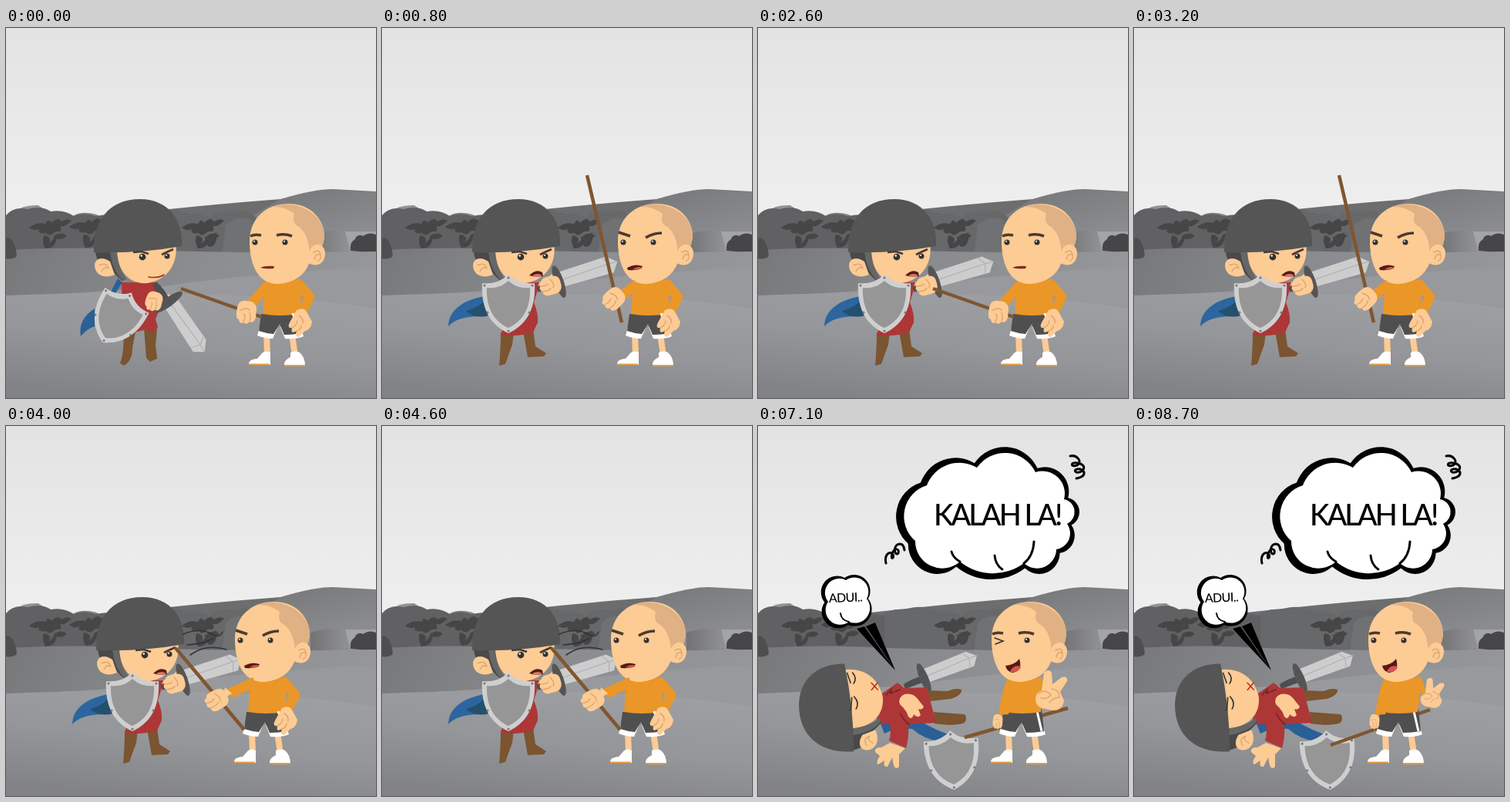
These frames come from a looping animation (480x480 px, 8900 ms). An HTML page:

```html
<!DOCTYPE html>
<html lang="ms">
<head>
<meta charset="utf-8">
<title>Duel</title>
<style>
html, body { margin: 0; width: 100%; height: 100%; overflow: hidden; background: #eee; }
svg { display: block; width: 100vw; height: 100vh; }
[data-on] { display: none; }
[data-on].on { display: inline; }
text { font-family: Lato, "Open Sans", sans-serif; font-weight: 500; fill: #050505; }
.skin { fill: #fdcb94; }
.crease { fill: none; stroke: #dca873; stroke-width: 1.5; stroke-linecap: round; }
.orange { fill: #ea9628; }
.sleeve { fill: none; stroke: #ea9628; stroke-width: 13; stroke-linejoin: round; }
.staff { stroke: #7f5630; stroke-width: 4.5; }
.brow { fill: none; stroke: #4b3b32; stroke-width: 3.6; }
.thin { stroke-width: 2.6; }
.dark { fill: #555; }
.red { fill: #ad3737; }
.boot { fill: #7b5430; }
.line { fill: none; stroke: #333; stroke-width: 1.6; stroke-linecap: round; }
.ink { fill: none; stroke: #050505; stroke-width: 3; stroke-linecap: round; }
</style>
</head>
<body>
<svg viewBox="0 0 480 480">
<defs>
  <linearGradient id="sky" x2="0" y2="1"><stop stop-color="#e3e3e3"/><stop offset=".75" stop-color="#eee"/></linearGradient>
  <linearGradient id="field" x2="1" y2=".2"><stop stop-color="#77787a"/><stop offset=".5" stop-color="#8b8c8f"/><stop offset="1" stop-color="#96979a"/></linearGradient>
  <linearGradient id="near" x1=".7" y1="0" x2=".3" y2="1"><stop stop-color="#9d9fa2"/><stop offset=".5" stop-color="#949699"/><stop offset="1" stop-color="#828386"/></linearGradient>
  <linearGradient id="hill" x2=".5" y2="1"><stop stop-color="#747577"/><stop offset="1" stop-color="#909194"/></linearGradient>
  <linearGradient id="mist"><stop stop-color="#737375"/><stop offset="1" stop-color="#929396"/></linearGradient>
  <g id="leaves" fill="#464647">
    <path d="M30 259Q40 251 51 254Q55 246 59 253Q67 244 72 251Q80 246 85 250Q76 259 70 257Q75 265 64 264Q56 272 52 266Q40 268 43 261Q36 264 30 259Z"/>
    <path d="M49 269Q61 271 55 280Q62 275 63 269Q72 264 79 269Q74 276 66 273Q63 287 51 286Q46 277 49 269Z"/>
  </g>
  <g id="eye"><circle r="3.5" fill="#333"/><circle cx="-1" cy="-1.3" r="1" fill="#fff"/></g>
  <g id="fist">
    <path class="skin" d="M-12-5Q-10-16 0-14Q12-14 13-4L12 8Q9 16 4 13Q0 18-4 14Q-9 17-10 10Q-15 9-12-5Z"/>
    <path class="crease" d="M-4 13Q-1 8-3 3M4 12Q6 7 4 1M-8-2Q0-6 4-2"/>
  </g>
  <g id="shield">
    <path fill="#cfcfcf" d="M0-39C-10-28-22-26-34-27C-36 8-22 28 0 38C22 28 36 8 34-27C22-26 10-28 0-39Z"/>
    <path fill="#969696" d="M0-30C-9-22-18-20-28-21C-29 6-18 23 0 31C18 23 29 6 28-21C18-20 9-22 0-30Z"/>
    <g fill="#777"><circle cy="-34" r="1.5"/><circle cx="-31" cy="-24" r="1.5"/><circle cx="31" cy="-24" r="1.5"/><circle cx="-27" cy="11" r="1.5"/><circle cx="27" cy="11" r="1.5"/><circle cy="35" r="1.5"/></g>
  </g>
  <g id="sword">
    <path fill="#cdcdcd" d="M16-17L81-16L93-5L84 7L16 3Z"/>
    <path fill="none" stroke="#b3b3b3" stroke-width="1.3" d="M18-6H80L93-5M76-15L82-6L78 6"/>
    <path d="M-17-8Q-2-11 12-8V0L-17-1Z" fill="#4e4e50"/>
    <ellipse cx="13" cy="-5" rx="6" ry="22" fill="#555"/>
  </g>
  <g id="head">
    <path class="skin" d="M145 282L223 278C227 304 214 326 187 331C161 333 147 314 145 282Z"/>
    <path d="M119 288H139Q143 311 158 326L154 328Q141 319 137 304L123 303Q119 296 119 288Z" fill="#49494a"/>
    <path d="M138 288L147 288Q148 312 160 326L154 327Q140 314 138 288Z" fill="#666"/>
    <path class="skin" d="M138 303C125 294 115 302 119 313C122 322 133 325 144 320Z"/>
    <path class="crease" d="M124 308Q133 303 136 312M127 316Q131 308 136 312"/>
    <path class="dark" d="M117 291C115 250 137 222 177 222C214 222 233 250 231 283Q175 293 117 291Z"/>
    <g data-on="rest lunge hurt">
      <use href="#eye" transform="translate(180 297) scale(1.25)"/><use href="#eye" transform="translate(212 296)"/>
      <path class="brow thin" d="M168 291L179 290L188 293M205 294L211 291L220 287"/>
    </g>
    <path data-on="rest" class="line" style="stroke:#a02f25" d="M188 323Q201 325 208 320"/>
    <g data-on="lunge"><path fill="#551b17" d="M191 321Q200 312 208 317L209 322Q200 324 191 321Z"/><path fill="#d5776c" d="M195 321Q202 317 208 321Q202 325 195 321Z"/></g>
    <path data-on="hurt" class="line" style="stroke:#a02f25" d="M192 324Q200 317 209 322"/>
    <g data-on="out" class="line">
      <path d="M172 296Q180 301 188 294M205 294Q212 299 219 293M170 289L187 291M206 290L219 286"/>
      <path style="stroke:#b53024" d="M196 317L205 325M196 325L205 317"/>
    </g>
  </g>
  <path id="cloud" d="M219 77A45 45 0 0 1 284 54A44 44 0 0 1 360 60A29 29 0 0 1 397 95A17 17 0 0 1 401 127A21 21 0 0 1 387 160A25 25 0 0 1 345 178A68 68 0 0 1 262 176A35 35 0 0 1 204 149A42 42 0 0 1 219 77Z"/>
  <path id="puff" d="M91 228A18.500 18.500 0 0 1 114 200A18.500 18.500 0 0 1 141 224A19.500 19.500 0 0 1 118 254A19 19 0 0 1 91 228Z"/>
</defs>

<rect width="480" height="300" fill="url(#sky)"/>
<path d="M10 240Q20 229 42 230L56 240Z" fill="#929294"/>
<path d="M86 244Q100 236 120 243L110 260H86Z" fill="#858587"/>
<path d="M110 246Q260 229 356 222L480 240V300H110Z" fill="#6c6d6f"/>
<path d="M310 250Q335 234 356 222Q400 209 424 209L480 212V300H310Z" fill="url(#hill)"/>
<path d="M395 268Q420 260 448 264V300H395Z" fill="url(#mist)"/>
<path d="M440 264H480V290H447Z" fill="#a3a4a6"/>
<path d="M447 289Q446 277 452 275Q456 266 463 270Q471 264 480 268V292Z" fill="#464648"/>
<path d="M160 247Q172 236 190 238Q215 230 235 241Q253 239 263 246Q278 234 296 239Q318 231 330 255V294H160Z" fill="#67686a"/>
<path d="M285 256Q298 242 318 249L330 295H280Z" fill="#707173"/>
<path d="M0 243Q10 231 28 235Q46 230 58 238Q75 235 88 244Q100 238 116 244Q144 239 164 247V295H0Z" fill="#616163"/>
<use href="#leaves"/><use href="#leaves" x="52" y="-1"/><use href="#leaves" transform="translate(198)"/>
<path d="M258 270Q264 273 262 278Q266 268 273 265V275Q270 285 263 284Q258 277 258 270Z" fill="#464647"/>
<path d="M0 288Q90 283 170 288Q320 293 480 290V480H0Z" fill="url(#field)"/>
<path d="M0 272Q12 272 14 296Q8 301 0 299Z" fill="#4e4e50"/>
<path d="M0 348Q110 344 205 335Q310 319 480 310V480H0Z" fill="#97999c"/>
<path d="M0 347Q140 341 300 347Q390 350 480 364V480H0Z" fill="url(#near)"/>

<g id="knight" data-on="rest lunge">
  <g data-on="rest" transform="translate(-3)">
    <path d="M148 325L154 330L140 352L137 346ZM118 364Q96 378 100 400Q108 390 118 387Z" fill="#2a6097"/>
    <path class="boot" d="M155 394H171L167 415Q167 432 156 438L151 435Q157 420 155 394ZM182 390H199L197 412L199 429L190 433L185 428Z"/>
    <path class="red" d="M153 330H198L207 352L197 378L200 388L193 395L185 391L154 399Z"/>
    <use href="#shield" transform="translate(147 376) rotate(30) scale(.97)"/>
    <path class="skin" d="M197 344L216 346L215 356L201 362Z"/>
    <use href="#sword" transform="translate(202 348) rotate(54)"/>
    <use href="#fist" transform="translate(195 354) rotate(10) scale(.85)"/>
    <use href="#head"/>
  </g>
  <g data-on="lunge">
    <path d="M139 347C111 351 87 362 86 387Q98 373 133 374Z" fill="#2c659f"/>
    <path d="M133 352Q128 362 109 367Q121 378 139 373Z" fill="#22506d"/>
    <path class="boot" d="M154 395H171L169 411Q164 424 160 436L152 438Q154 415 154 395ZM183 393L196 391L199 413L213 422L210 426L189 427Z"/>
    <path class="red" d="M162 330H205L197 356Q203 370 202 382L196 395Q176 401 155 398Z"/>
    <path class="skin" d="M202 334L222 318L229 329L213 345Z"/>
    <use id="blade" href="#sword"/>
    <use href="#head"/>
    <use href="#shield" transform="translate(164 358)"/>
    <use href="#fist" transform="translate(219 334) rotate(70) scale(.95)"/>
  </g>
</g>

<g data-on="hurt out">
  <use href="#sword" transform="translate(206 336) rotate(-23) scale(.93)"/>
  <path d="M158 384Q190 373 216 386Q232 395 247 400L236 409Q216 407 200 393Q181 390 164 399Z" fill="#2a6097"/>
  <path class="boot" d="M220 343L246 344Q257 339 264 342Q265 349 250 354L223 357ZM228 371L268 374Q272 378 268 385Q256 390 229 386Z"/>
  <path class="red" d="M158 349L181 333L190 340L219 339L231 385L195 387Q196 405 192 418L170 408Q174 395 170 386L153 388Z"/>
  <path class="line" style="stroke:#702323" d="M166 349L173 342L172 347L184 342M185 373Q190 384 196 387"/>
  <path class="skin" d="M184 361Q181 352 190 348Q201 346 207 354L215 364Q213 369 208 367L211 375Q207 380 202 374Q200 382 195 377Q193 369 184 361ZM171 411L191 418L183 426L183 442Q179 447 176 440L174 430L168 442Q162 443 164 434L156 439Q152 437 158 428L152 423Q151 416 160 417Z"/>
  <use href="#shield" transform="translate(252 434) rotate(-4) scale(1.04 1)"/>
  <use href="#head" transform="translate(128 359) rotate(-92) translate(-180 -297)"/>
</g>

<g data-on="adui">
  <use href="#puff" transform="translate(113.500 227.500) scale(1.13) translate(-115 -227)"/>
  <path d="M128 263L138 260L178 317ZM140 260L152 255L178 317Z"/>
  <use href="#puff" fill="#fff"/>
  <path class="ink" style="stroke-width:2" d="M107 243Q108 252 118 254"/>
  <text x="92" y="229" font-size="16" letter-spacing="-.6" transform="rotate(-2 92 229)">ADUI..</text>
</g>

<g id="man">
  <path data-on="V" class="staff" d="M281 404L415 366"/>
  <path data-on="W" class="staff" d="M267 414L396 368"/>
  <path data-on="D" class="staff" d="M302 376L449 180"/>
  <path class="skin" d="M334 397H342L343 424H335ZM367 397H375L379 425H371Z"/>
  <path fill="#fff" d="M333 421Q338 418 343 421V437H315Q314 430 326 429ZM369 421Q376 418 381 421Q388 427 388 438H361Q360 431 369 427Z"/>
  <path d="M315 436.500H342M361 438H388" stroke="#e89a37" stroke-width="2"/>
  <path fill="#fff" d="M329 388L352 389L346 403Q336 403 326 399ZM356 388L381 385L386 400Q376 404 362 403Z"/>
  <path fill="#4f4f50" d="M331 371L381 367L384 396Q372 398 361 398L355 384L347 397Q337 396 328 393Z"/>
  <path data-on="V W" d="M375 370L381 396" stroke="#fff" stroke-width="3"/>
  <path class="orange" d="M336 327Q357 334 381 325L384 340L380 371Q355 375 333 371Z"/>
  <g data-on="A B C D">
    <path class="sleeve" d="M378 330L394 349L383 370"/>
    <path d="M372 370L378 388" stroke="#fff" stroke-width="3"/>
    <path class="skin" d="M377 366Q387 361 391 370L397 381Q396 391 388 393L380 401Q374 400 377 393Q369 398 371 389Q364 390 368 382Z"/>
    <path class="crease" d="M377 393Q383 391 383 386M371 389Q377 386 378 380M380 373Q386 376 385 383"/>
  </g>
  <path class="skin" d="M316 277C316 246 338 228 367 228C396 228 413 249 413 270Q412 281 408 288L393 306Q384 329 354 332C323 333 316 300 316 277Z"/>
  <path fill="#dfb184" d="M344 232Q369 224 391 236Q413 249 413 271Q412 280 408 286Q396 281 394 295Q393 264 377 256Q371 252 374 241Q362 231 344 232Z"/>
  <path class="skin" d="M394 288C401 275 415 281 414 294C412 309 400 310 391 304Z"/>
  <path class="crease" d="M399 291Q407 286 408 295M400 300Q402 291 408 295Q409 302 404 302"/>
  <use href="#eye" x="362" y="278"/>
  <use data-on="A B C D W" href="#eye" x="323" y="278"/>
  <path data-on="A V W" class="brow" d="M317 270Q323 267 331 269M351 269Q361 266 371 270"/>
  <path data-on="B C D" class="brow" d="M317 265L332 270M352 272Q362 266 373 266"/>
  <path data-on="V" class="line" d="M320 275L331 279L321 283"/>
  <path data-on="A" fill="#7a2b22" d="M330 311Q336 308 348 309L347 312Q337 313 330 311Z"/>
  <g data-on="B C D"><path fill="#551b17" d="M328 311Q338 305 348 309Q347 315 329 314Z"/><path fill="#d5574c" d="M335 313Q342 308 348 311Q344 315 335 313Z"/></g>
  <g data-on="V W"><path fill="#551b17" d="M334 311Q346 310 352 302Q357 318 343 320Q336 319 334 311Z"/><path fill="#d5574c" d="M340 319Q344 309 354 312Q353 320 340 319Z"/></g>
  <g data-on="A">
    <path class="staff" d="M227 338L332 375"/><path class="sleeve" d="M341 332L318 358"/>
    <use href="#fist" transform="translate(312 368)"/>
  </g>
  <g data-on="B">
    <path class="line" d="M249 270Q270 261 286 270Q296 276 300 267M254 284Q279 282 288 275M258 297Q278 282 305 290"/>
    <path class="staff" d="M239 288L328 394"/><path class="sleeve" d="M342 332L309 347"/>
    <path class="skin" d="M303 339L312 347L300 354Z"/>
    <use href="#fist" transform="translate(293 355) rotate(55)"/>
  </g>
  <g data-on="C">
    <path class="staff" d="M276 191L321 382"/><path class="sleeve" d="M341 332L316 351"/>
    <use href="#fist" transform="translate(311 351) rotate(40)"/>
  </g>
  <g data-on="D"><path class="sleeve" d="M341 332L318 358"/><use href="#fist" transform="translate(311 366)"/></g>
  <g data-on="V W">
    <path class="orange" d="M335 331L347 333L338 374L325 375Q328 349 335 331Z"/>
    <use href="#fist" transform="translate(324 383) scale(.5 .65)"/>
    <path data-on="W" class="sleeve" d="M378 327L385 347"/>
    <g id="peace">
      <path class="skin" d="M381 343L384 320Q390 314 394 320L395 335L407 326Q415 324 414 331L405 345L410 356Q408 369 396 369L381 366Q373 363 373 354Q373 346 381 343Z"/>
      <path class="crease" d="M377 347Q386 340 393 349Q388 355 380 353M394 341Q404 342 404 352Q395 353 391 359"/>
    </g>
  </g>
</g>

<g data-on="shout">
  <use href="#cloud" transform="translate(298 112) scale(1.075 1.1) translate(-300 -112)"/>
  <use href="#cloud" fill="#fff"/>
  <path class="ink" d="M345 178Q357 169 358 150M262 176Q253 171 251 163M307 168Q308 180 317 186"/>
  <text x="228" y="129" font-size="38" letter-spacing="-3">KALAH LA!</text>
  <path class="ink" d="M405 39C413 37 422 46 414 51C405 54 405 46 414 48C429 50 422 62 413 60C407 56 419 53 423 60Q424 66 413 68M166 178C164 169 168 163 174 165C179 170 171 176 174 166C177 157 184 159 182 165C177 170 174 154 184 153Q189 153 190 161"/>
</g>
</svg>
<script>
const LOOP = 8900;
const $ = id => document.getElementById(id);
const manX = { A: 0, B: -19, C: -10, D: -1, V: -13, W: -12 };

// start ms, states, man's pose, knight shift, blade angle, tilt, man's hop
const steps = [
  [0, 'rest', 'A'], [200, 'lunge', 'C'], [400, 'lunge', 'B'], [600, 'rest', 'A'],
  [800, 'lunge', 'C'], [1000, 'lunge', 'B'], [1200, 'lunge', 'C'],
  [1400, 'lunge', 'C', -32, -10], [1600, 'lunge', 'B', -63, 0], [1800, 'lunge', 'C', -63, 0],
  [2000, 'lunge', 'B', -63, 0], [2200, 'lunge', 'C', -32, -10], [2400, 'lunge', 'B'],
  [2500, 'lunge', 'C'], [2600, 'lunge', 'A'], [2700, 'lunge', 'C'], [2800, 'rest', 'B'],
  [2900, 'rest', 'C'], [3000, 'lunge', 'A'], [3200, 'lunge', 'C'], [3400, 'lunge', 'B'],
  [3600, 'lunge', 'C'], [3800, 'lunge', 'A'], [4000, 'lunge', 'B'], [4200, 'lunge', 'C'],
  [4300, 'lunge', 'D'], [4400, 'lunge', 'C'], [4600, 'lunge', 'B'],
  [4800, 'lunge', 'B', 0, -19, -22], [5000, 'lunge', 'C', 10, -19, -46],
  [5200, 'lunge', 'V', 22, -19, -72], [5400, 'hurt', 'V'], [5600, 'hurt adui', 'V']
];
// victory dance: wink, hop, stand
for (let i = 0; i < 15; i++)
  steps.push([5900 + i * 200, 'out adui shout', 'VVW'[i % 3], 0, 0, 0, i % 3 === 1 ? -27 : 0]);

const parts = [...document.querySelectorAll('[data-on]')].map(el => [el, el.dataset.on.split(' ')]);
let last;

function pose([, states, man, dx = 0, blade = -19, tilt = 0, hop = 0]) {
  const active = [...states.split(' '), man];
  for (const [el, on] of parts) el.classList.toggle('on', on.some(s => active.includes(s)));
  $('man').setAttribute('transform', `translate(${manX[man]} ${hop})`);
  $('peace').setAttribute('transform', man === 'W' ? 'translate(104 89) scale(.75)' : '');
  $('knight').setAttribute('transform', `translate(${dx} ${-tilt / 5}) rotate(${tilt} 185 360)`);
  $('blade').setAttribute('transform', `translate(219 338) rotate(${blade})`);
}

function tick() {
  const t = performance.now() % LOOP;
  const step = steps.findLast(s => s[0] <= t);
  if (step !== last) pose(last = step);
  requestAnimationFrame(tick);
}
tick();
</script>
</body>
</html>
```
